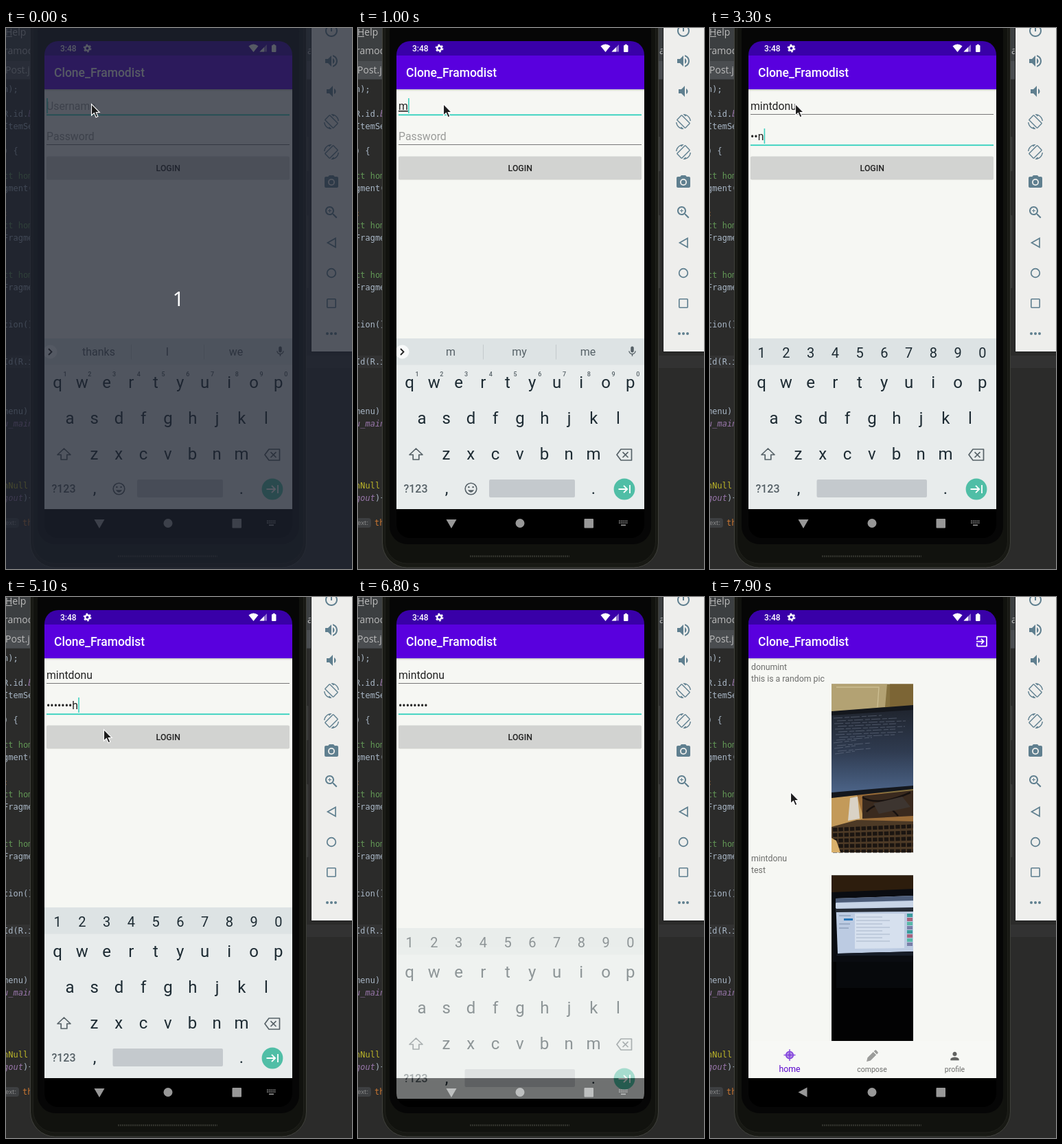
Write an HTML page that moves like this. It is 504 by 786 pixels and loops after 8 s.

```html
<!DOCTYPE html>
<html lang="en">
<head>
<meta charset="utf-8">
<title>Login demo</title>
<style>
html, body { margin: 0; width: 100%; height: 100%; overflow: hidden; background: #2b2b2b; }
svg { display: block; width: 504px; height: 786px; font-family: Roboto, sans-serif; }
text { white-space: pre; }
.mono { font-family: "DejaVu Sans Mono", monospace; }
.ui { font-family: "Open Sans", sans-serif; }
</style>
</head>
<body>
<svg id="stage" viewBox="0 0 504 786" xmlns="http://www.w3.org/2000/svg"></svg>
<script>
const LOOP = 8000, STEP = 100;
const USER = 'mintdonu', PASS = 'mintdonh';

// ---- drawing helpers ----
const text = (x, y, str, size, fill, more = '') =>
  `<text x="${x}" y="${y}" font-size="${size}" fill="${fill}" ${more}>${str}</text>`;
const mid = (x, y, str, size, fill, more = '') =>
  text(x, y, str, size, fill, 'text-anchor="middle" ' + more);
const rect = (x, y, w, h, fill, more = '') =>
  `<rect x="${x}" y="${y}" width="${w}" height="${h}" fill="${fill}" ${more}/>`;
const circle = (x, y, r, fill, more = '') =>
  `<circle cx="${x}" cy="${y}" r="${r}" fill="${fill}" ${more}/>`;
const path = (d, fill, more = '') => `<path d="${d}" fill="${fill}" ${more}/>`;
const line = (d, stroke, w = 1, more = '') =>
  path(d, 'none', `stroke="${stroke}" stroke-width="${w}" ${more}`);
const group = (id, body, more = '') => `<g id="${id}" ${more}>${body}</g>`;
const icon = (x, y, size, d, fill, flip = 1) =>
  path(d, fill, `transform="translate(${x} ${y}) scale(${flip * size / 24} ${size / 24}) translate(-12 -12)"`);
const each = (list, fn) => [...list].map(fn).join('');

const ICON = {
  power: 'M13 3h-2v10h2V3zm4.83 2.17l-1.42 1.42C17.99 7.86 19 9.81 19 12c0 3.87-3.13 7-7 7s-7-3.13-7-7c0-2.19 1.01-4.14 2.58-5.42L6.17 5.17C4.23 6.82 3 9.26 3 12c0 4.97 4.03 9 9 9s9-4.03 9-9c0-2.74-1.23-5.18-3.17-6.83z',
  loud: 'M3 9v6h4l5 5V4L7 9H3zm13.5 3c0-1.77-1.02-3.29-2.5-4.03v8.05c1.48-.73 2.5-2.25 2.5-4.02zM14 3.23v2.06c2.89.86 5 3.54 5 6.71s-2.11 5.85-5 6.71v2.06c4.01-.91 7-4.49 7-8.77s-2.99-7.86-7-8.77z',
  quiet: 'M18.5 12c0-1.77-1.02-3.29-2.5-4.03v8.05c1.48-.73 2.5-2.25 2.5-4.02zM5 9v6h4l5 5V4L9 9H5z',
  turn: 'M16.48 2.52c3.27 1.55 5.61 4.72 5.97 8.48h1.5C23.44 4.84 18.29 0 12 0l-.66.03 3.81 3.81 1.33-1.32zm-6.25-.77c-.59-.59-1.54-.59-2.12 0L1.75 8.11c-.59.59-.59 1.54 0 2.12l12.02 12.02c.59.59 1.54.59 2.12 0l6.36-6.36c.59-.59.59-1.54 0-2.12L10.23 1.75zm4.6 19.44L2.81 9.17l6.36-6.36 12.02 12.02-6.36 6.36zm-7.31.29C4.25 19.94 1.91 16.76 1.55 13H.05C.56 19.16 5.71 24 12 24l.66-.03-3.81-3.81-1.33 1.32z',
  zoom: 'M15.5 14h-.79l-.28-.27C15.41 12.59 16 11.11 16 9.5 16 5.91 13.09 3 9.5 3S3 5.91 3 9.5 5.91 16 9.5 16c1.61 0 3.09-.59 4.23-1.57l.27.28v.79l5 4.99L20.49 19l-4.99-5zm-6 0C7.01 14 5 11.99 5 9.5S7.01 5 9.5 5 14 7.01 14 9.5 11.99 14 9.5 14zm2.5-4h-2v2H9v-2H7V9h2V7h1v2h2v1z',
  camera: 'M9 2L7.17 4H4c-1.1 0-2 .9-2 2v12c0 1.1.9 2 2 2h16c1.1 0 2-.9 2-2V6c0-1.1-.9-2-2-2h-3.17L15 2H9z',
  mic: 'M12 14c1.66 0 3-1.34 3-3V5c0-1.66-1.34-3-3-3S9 3.34 9 5v6c0 1.66 1.34 3 3 3zm5.3-3c0 3-2.54 5.1-5.3 5.1S6.7 14 6.7 11H5c0 3.41 2.72 6.23 6 6.72V21h2v-3.28c3.28-.48 6-3.3 6-6.72h-1.7z',
  exit: 'M10.09 15.59L11.5 17l5-5-5-5-1.41 1.41L12.67 11H3v2h9.67l-2.58 2.59zM19 3H5c-1.11 0-2 .9-2 2v4h2V5h14v14H5v-4H3v4c0 1.1.89 2 2 2h14c1.1 0 2-.9 2-2V5c0-1.1-.9-2-2-2z',
  person: 'M12 12c2.21 0 4-1.79 4-4s-1.79-4-4-4-4 1.79-4 4 1.79 4 4 4zm0 2c-2.67 0-8 1.34-8 4v2h16v-2c0-2.66-5.33-4-8-4z',
  pencil: 'M3 21L4.5 14.5L14 5L19 10L9.5 19.5ZM15 4L17 2.2Q18 1.4 19 2.4L21.6 5Q22.6 6 21.8 7L20 9Z'
};

// ---- code editor behind the phone ----
function editor() {
  const plain = '#a9b7c6', doc = '#629755', violet = '#9876aa';
  const rows = [
    [89, 'n);', plain], [125, 'R.id.', plain], [143, 'ItemSe', plain], [179, ') {', plain],
    [215, 'ct hom', doc], [233, 'gment(', plain], [269, ';', '#cc7832'], [287, 'ct hom', doc],
    [305, 'Fragme', plain], [359, 'ct hom', doc], [377, 'Fragme', plain], [431, 'tion()', plain],
    [485, 'Id(R.i', plain], [557, 'menu)', plain], [575, 'u_main', violet, 1],
    [665, 'nNull', '#bbb529'], [683, 'gout', violet, 1]
  ];
  return rect(0, 0, 504, 786, '#2b2b2a') + rect(0, 0, 504, 75, '#3c3f41') +
    rect(0, 48, 504, 26, '#4a4d50') + rect(0, 476, 504, 18, '#323232') +
    text(-1, 11, 'Help', 14, '#bbbbbb', 'class="ui"') + line('M0 12.5H9', '#bbbbbb') +
    text(-3, 38, 'ramodi', 14, '#bbbbbb', 'class="ui"') + text(439, 38, 'ap', 14, '#bbbbbb', 'class="ui"') +
    text(-1, 66, 'Post.j', 14, '#bbbbbb', 'class="ui"') +
    `<g class="mono">` + each(rows, ([y, s, c, it]) =>
      text(-4, y + 4, s, 12, c, it ? 'font-style="italic"' : '')) +
    text(32, 129, 'b', 12, violet, 'font-style="italic"') + text(25, 687, '){', 12, plain) +
    text(24, 723, 'th', 12, '#cc7832') + '</g>' +
    rect(-4, 712, 23, 14, '#3d3f41', 'rx="4"') + text(-1, 722, 'ext:', 9.5, '#8c8c8c', 'class="ui"');
}

// ---- emulator tool panel ----
function panel() {
  const c = '#5f7f8f', bg = '#eeeeec';
  return rect(444, 0, 60, 471, '#1b1c1c') + rect(445, 0, 59, 470, bg) +
    icon(474, 4, 24, ICON.power, c) + icon(474, 48, 24, ICON.loud, c) + icon(474, 92, 24, ICON.quiet, c) +
    icon(474, 136, 22, ICON.turn, c) + icon(474, 180, 22, ICON.turn, c, -1) +
    icon(474, 224, 24, ICON.camera, c) + circle(474, 224, 5, bg) + circle(474, 224, 3.2, c) +
    icon(474, 268, 24, ICON.zoom, c) +
    line('M480 305.5V318.5L468.5 312Z', c, 1.7) +
    circle(474, 356, 6.3, 'none', `stroke="${c}" stroke-width="1.7"`) +
    rect(467.8, 393.8, 12.4, 12.4, 'none', `rx="1" stroke="${c}" stroke-width="1.6"`) +
    each([468, 474, 480], x => circle(x, 444, 2, c));
}

function phone() {
  return rect(437, 158, 3.5, 50, '#3a3b39', 'rx="1"') + rect(437, 272, 3.5, 106, '#3a3b39', 'rx="1"') +
    rect(35.5, -60, 402, 844, '#181914', 'rx="36" stroke="#40413c"') +
    rect(39.5, -60, 394, 838, '#11120e', 'rx="32" stroke="#20211c"') +
    rect(46, -20, 381, 770, '#060606', 'rx="26"') +
    line('M163 767.5H308', '#33342e', 2.5, 'stroke-dasharray="2 1"');
}

// ---- app screens ----
function bars() {
  return rect(56, 19, 361, 21, '#3900a8') + rect(56, 40, 361, 49, '#5900de') +
    text(79, 34, '3:48', 12, '#fff', 'font-weight="500"') +
    circle(118.5, 29.5, 3.2, 'none', 'stroke="#fff" stroke-width="2.4"') +
    circle(118.5, 29.5, 5, 'none', 'stroke="#fff" stroke-width="1.8" stroke-dasharray="2.6 2.636"') +
    path('M353.5 26.2Q360.5 21 367.5 26.2L360.5 35Z', '#fff') +
    path('M380 24V34.5H369.5Z', '#fff', 'opacity=".45"') + path('M376 28V34.5H369.5Z', '#fff') +
    rect(387, 25, 6.5, 10, '#fff', 'rx="1"') + rect(388.8, 23.8, 3, 2, '#fff') +
    text(70, 71, 'Clone_Framodist', 17.5, '#fff', 'font-weight="500"');
}

const page = () => rect(56, 89, 361, 610, '#f6f7f3') + rect(56, 89, 361, 3, 'url(#drop)');

function login() {
  return page() +
    text(59, 119, '', 15.8, '#222', 'id="user"') + text(59, 163, '', 15.8, '#222', 'id="pass"') +
    rect(59, 125, 354, 1, '#777', 'id="line1"') + rect(59, 169, 354, 1, '#777', 'id="line2"') +
    rect(0, 102, 1.6, 22, '#3fd2c0', 'id="caret"') +
    rect(59, 188, 354, 32.5, '#000', 'rx="2" opacity=".15"') +
    rect(59, 186.5, 354, 32.5, '#d2d3d1', 'rx="2"') +
    group('ripple', circle(0, 0, 1, '#000', 'id="wave" opacity=".1"'), 'clip-path="url(#button)"') +
    mid(236.3, 207.5, 'LOGIN', 12.3, '#222', 'font-weight="500"');
}

function keyboard() {
  const ink = '#1d2b33', soft = '#566167';
  const keyX = (x0, i) => x0 + 35.75 * i;
  const keys = (str, x0, y, size = 24) => each(str, (k, i) => mid(keyX(x0, i), y, k, size, ink));
  return rect(56, 451, 361, 248, '#e8ecec') + rect(56, 451, 361, 38.5, '#dde3e4') +
    group('words',
      circle(64.5, 470.5, 10, '#f8fafa') + line('M62 466L66.5 470.5L62 475', '#222', 1.8) +
      line('M182.5 460V481.5M288.5 460V481.5', '#c3cacc') +
      each([135, 235, 335], (x, i) => mid(x, 476, '', 16, soft, `id="word${i}"`)) +
      icon(399.5, 470, 18, ICON.mic, soft)) +
    group('digits', keys('1234567890', 75, 479, 20)) +
    keys('qwertyuiop', 75, 523) + keys('asdfghjkl', 93, 575) + keys('zxcvbnm', 128.5, 627) +
    group('hints', each('1234567890', (k, i) => mid(keyX(86, i), 506, k, 9, soft, 'font-weight="500"'))) +
    line('M84.5 611L94 620H88.8V627H80.2V620H75Z', soft, 1.7, 'stroke-linejoin="round"') +
    line('M383 612H398.5V628H383L377 620Z', soft, 1.7, 'stroke-linejoin="round"') +
    line('M385.5 616.2L393.5 624M393.5 616.2L385.5 624', soft, 1.7) +
    mid(84, 675, '?123', 16, soft, 'font-weight="500"') +
    mid(129, 677, ',', 24, ink) + mid(343, 677, '.', 24, ink) +
    group('smile', circle(164.5, 669.5, 8.3, 'none', `stroke="${soft}" stroke-width="1.6"`) +
      circle(161.4, 667, 1.3, soft) + circle(167.6, 667, 1.3, soft) + path('M159.8 671.3H169.2Q164.5 678 159.8 671.3Z', soft)) +
    rect(191, 656, 125, 26, '#c4c9cd', 'rx="2" id="space"') +
    circle(388, 670, 15.4, '#50bea6') +
    line('M379.5 670H392M387 664.8L392.2 670L387 675.2M396 664V676', '#fff', 1.8);
}

function photoDesk() {
  let code = '', keys = '';
  for (let i = 0; i < 14; i++) {
    const x = 180 + i * 5 % 9, y = 176 + i * 4;
    code += line(`M${x} ${y}l${(i < 8 ? 70 : 24) + i * 17 % 36} -4`, '#8a95a8', 1, 'opacity=".4" stroke-dasharray="13 3 7 2"');
  }
  for (let r = 0; r < 5; r++) {
    keys += line(`M179 ${338 + r * 8}L296 ${333 + r * 9}`, '#1b1511', 5.5, 'stroke-dasharray="6.5 1.8"');
  }
  return `<g clip-path="url(#pic1)">` + rect(177, 126, 119, 245, '#85713f') +
    path('M177 126H258L255 160L177 167Z', '#b3a273') + line('M184 131H246L244 160', '#cdbf93', 1.3) +
    path('M262 126H296V158L262 160Z', '#7c6535') +
    path('M177 285H296V371H177Z', '#9a6c38') + path('M177 292L214 288L224 322L177 335Z', '#c39a5a') +
    path('M177 166L296 157V279L177 292Z', '#14171d') + path('M177 172L296 164V274L177 284Z', 'url(#glass)') + code +
    path('M222 289L296 281V318L222 322Z', '#3a2a1e') + line('M222 291Q245 305 292 284M228 312Q250 290 274 318', '#17110f', 2.5) +
    path('M238 300L280 290L292 305L246 315Z', '#3d3530') +
    path('M204 292L215 290L218 322L201 325Z', '#d9d2c5') +
    path('M177 334L214 324L296 326V371H177Z', '#4d3a26') + keys +
    path('M177 350L184 354L190 371H177Z', '#d9b06b') + '</g>';
}

function photoLaptop() {
  const tint = ['#3a9c9c', '#a8637c', '#58b8a8', '#7a7fa8'];
  let rows = '', thumbs = '';
  for (let i = 0; i < 8; i++) {
    rows += line(`M213 ${465 + i * 5}h${38 + i * 11 % 22}`, '#8b9bb4', 1.1, 'opacity=".6"');
    thumbs += rect(287, 460 + i * 6, 8, 5, tint[i % 4]);
  }
  return `<g clip-path="url(#pic2)">` + rect(177, 404, 119, 241, '#020203') +
    rect(177, 404, 119, 25, '#2d1d0d') + path('M177 429L296 424V530H177Z', '#0a0c11') +
    path('M183 438L296 434V515L186 518Z', '#bccbe2') + path('M183 438L296 434V441L183 444Z', '#4c5c78') +
    path('M183 445L296 442V450L183 452Z', '#c8d5e7') + path('M183 453L296 451V457L183 458Z', '#262c36') +
    path('M211 460H283V510L211 511Z', '#d6e0ee') + rows + thumbs +
    rect(195, 467, 13, 3, '#2878ba') + line('M188 463H205M188 475H204M188 481H202', '#7b8da9', 1) +
    path('M186 518L296 515V521H184Z', '#161c27') + rect(184, 530, 112, 38, '#07090c') + '</g>';
}

function home() {
  const gray = '#6c6d6b', violet = '#5a05cd', glow = '#8648dd';
  const post = (y, who, what) => text(60, y, who, 12.3, gray) + text(60, y + 16.7, what, 12.3, gray);
  return bars() + page() + icon(396, 64.5, 21, ICON.exit, '#fff') +
    group('posts', post(106, 'donumint', 'this is a random pic') + post(384.3, USER, 'test')) +
    group('photo1', photoDesk()) + group('photo2', photoLaptop()) +
    rect(56, 645, 361, 54, '#f7f8f5') +
    circle(116, 665.5, 5.2, '#b594e6', `stroke="${glow}" stroke-width="1.8"`) + circle(116, 665.5, 2, glow) +
    line('M116 657V674M107.5 665.5H124.5', glow, 1.4) +
    mid(116, 690, 'home', 12.3, violet) +
    icon(236, 667, 21, ICON.pencil, '#9b9c9a') + mid(236, 690, 'compose', 10.5, gray) +
    icon(356.5, 667, 18.5, ICON.person, '#626361') + mid(356.5, 690, 'profile', 10.5, gray);
}

function navIcons() {
  const c = '#989898';
  let dots = '';
  for (let i = 0; i < 10; i++) dots += rect(380 + i % 5 * 2.7, 715.5 + (i / 5 | 0) * 2.7, 1.6, 1.6, c);
  return group('down', path('M128.5 714H143.5L136 727Z', c) + dots + rect(383, 721.5, 7, 1.6, c)) +
    group('back', path('M141.5 712.5V726.5L128.5 719.5Z', c)) +
    circle(236, 719.5, 6.5, c) + rect(329.5, 713, 13.5, 13.5, c, 'rx="1"');
}

const clip = (id, x, y, w, h, r = 0) => `<clipPath id="${id}">${rect(x, y, w, h, '#000', `rx="${r}"`)}</clipPath>`;

document.getElementById('stage').innerHTML =
  '<defs>' + clip('screen', 56, 19, 361, 722, 20) + clip('button', 59, 186.5, 354, 32.5, 2) +
  clip('pic1', 177, 126.5, 119, 245) + clip('pic2', 177, 404.5, 119, 240.5) +
  '<linearGradient id="drop" x2="0" y2="1"><stop stop-color="#000" stop-opacity=".2"/><stop offset="1" stop-color="#000" stop-opacity="0"/></linearGradient>' +
  '<linearGradient id="glass" x2="0" y2="1"><stop stop-color="#20252f"/><stop offset=".5" stop-color="#2f3b50"/><stop offset="1" stop-color="#4c6488"/></linearGradient></defs>' +
  editor() + phone() + panel() +
  '<g clip-path="url(#screen)">' + bars() + login() + group('home', home()) +
  rect(56, 699, 361, 42, '#000') + navIcons() + group('keys', keyboard()) + '</g>' +
  group('shade', rect(0, 0, 504, 786, 'rgb(30,35,48)', 'opacity=".75"') +
    mid(251, 404, '1', 29, '#fff', 'style="font-family:\'Noto Sans\',sans-serif"')) +
  group('mouse', path('M0 0V16.5L3.9 13L6.6 19.2L9.4 18L6.7 12H11.8Z', '#1c1c1c', 'stroke="#fff" stroke-width="1.1"'));

// ---- timeline ----
const $ = {};
document.querySelectorAll('#stage [id]').forEach(el => $[el.id] = el);

const typedUser = [[0, 0], [1000, 1], [1200, 2], [1300, 3], [1600, 4], [1700, 6], [1800, 7], [2200, 8]];
const typedPass = [[0, 0], [3000, 1], [3200, 2], [3300, 3], [3600, 4], [3700, 6], [3800, 7], [4300, 8]];
const words = [
  [0, 'thanks', 'I', 'we'], [1000, 'm', 'my', 'me'], [1200, 'mi', 'mine', 'mid'],
  [1300, 'min', 'mind', 'mint'], [1600, 'mint', 'mints', 'mine'], [1700, 'mintd', 'minted', 'mind'],
  [1800, 'mintdo', 'mint done', 'mint dog'], [2000, 'mintdon', 'mint done', 'mint dog'],
  [2200, USER, 'mint donut', 'mint done']
];
const caretOn = [[0, 1], [4700, 0], [5100, 1], [5500, 0], [5700, 1], [6100, 0]];
const mouse = [
  [0, 124.5, 110.5], [5100, 142.5, 192.5], [5200, 158, 212], [5300, 167, 217.5], [5500, 169, 217],
  [5700, 178, 214], [5800, 188, 212], [5900, 199, 213], [6000, 206, 215], [6100, 211, 217],
  [6300, 91.5, 244.5], [6600, -40, 300], [7500, 28, 322], [7600, 62, 306],
  [7700, 92, 293], [7800, 112, 286], [7900, 117.5, 283.5]
];

const at = (track, t) => track.filter(k => k[0] <= t).pop().slice(1);
const clamp = v => Math.max(0, Math.min(1, v));
const show = (el, on) => el.setAttribute('display', on ? 'inline' : 'none');
const set = (el, props) => Object.entries(props).forEach(([k, v]) => el.setAttribute(k, v));

function field(el, str, hint) {
  el.textContent = str || hint;
  el.setAttribute('fill', str ? '#222' : '#9b9c9a');
}

function focusLine(el, y, on) {
  set(el, on ? { y: y + 0.4, height: 1.75, fill: '#2bd0bb' } : { y: y, height: 1, fill: '#777' });
}

function draw(t) {
  show($.shade, t < 200);

  const inPass = t >= 2400;
  const user = USER.slice(0, at(typedUser, t)[0]);
  const n = at(typedPass, t)[0];
  const masked = t >= 5500 ? n : Math.max(0, n - 1);
  const pass = '•'.repeat(masked) + PASS.slice(masked, n);
  field($.user, user, 'Username');
  field($.pass, pass, 'Password');
  $.user.setAttribute('text-decoration', user && !inPass ? 'underline' : 'none');
  focusLine($.line1, 125, !inPass);
  focusLine($.line2, 169, inPass);

  const typed = inPass ? pass : user;
  const width = typed ? (inPass ? $.pass : $.user).getComputedTextLength() : 0;
  set($.caret, { x: 59.2 + width, y: inPass ? 146 : 102 });
  show($.caret, at(caretOn, t)[0]);

  const wave = (t - 5600) / 500;
  show($.ripple, wave > 0 && wave < 1);
  set($.wave, { cx: 190, cy: 205, r: 260 * clamp(wave), opacity: 0.12 * (1 - clamp(wave)) });

  const digits = t >= 2500;
  show($.words, !digits);
  show($.hints, !digits);
  show($.smile, !digits);
  show($.digits, digits);
  set($.space, digits ? { x: 155.5, width: 160.5 } : { x: 191, width: 125 });
  at(words, t).forEach((w, i) => $['word' + i].textContent = w);

  const hide = clamp((t - 6500) / 300);
  set($.keys, { transform: `translate(0 ${30 * hide * hide})`, opacity: 1 - 0.52 * hide });
  show($.keys, t < 6900);
  show($.down, t < 6900);
  show($.back, t >= 6900);

  const open = clamp((t - 6900) / 300);
  show($.home, open > 0);
  set($.home, { opacity: open, transform: `translate(0 ${40 * (1 - open) ** 2})` });
  show($.posts, t >= 7300);
  show($.photo1, t >= 7500);
  show($.photo2, t >= 7600);

  $.mouse.setAttribute('transform', `translate(${at(mouse, t).join(' ')})`);
}

let last = -1;
function tick() {
  const t = Math.floor(performance.now() % LOOP / STEP) * STEP;
  if (t !== last) draw(last = t);
  requestAnimationFrame(tick);
}
tick();
</script>
</body>
</html>
```
